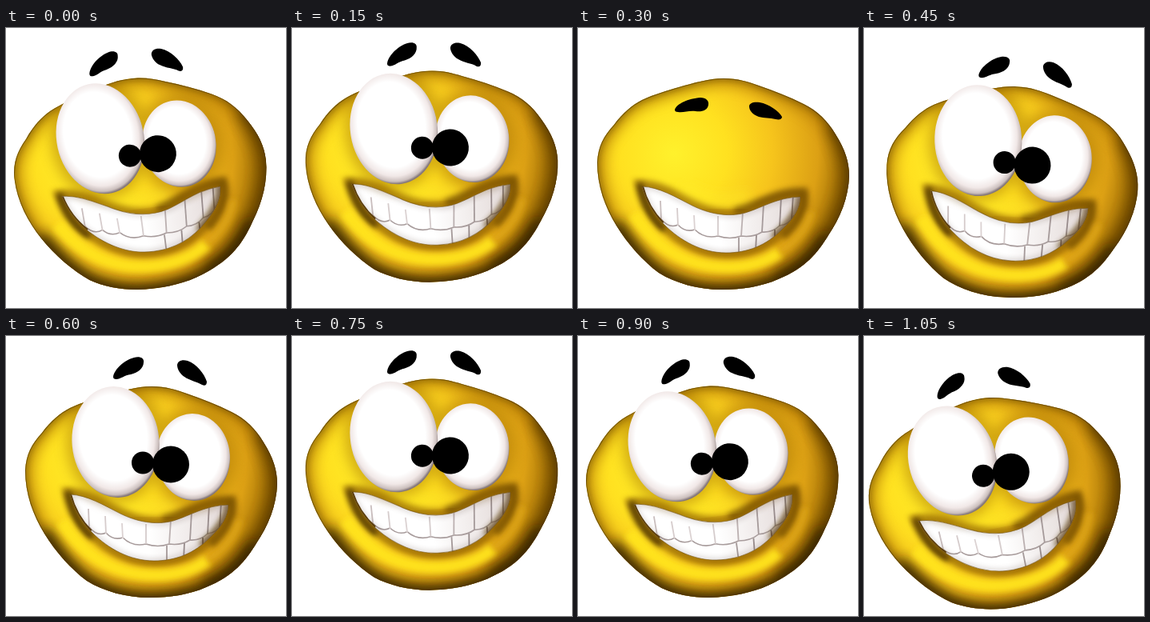
Animation of 350 by 350 pixels, one loop 1200 ms. Source, as an HTML page:

```html
<!DOCTYPE html>
<html lang="en">
<head>
<meta charset="utf-8">
<title>Swaying grin</title>
<style>
html, body { margin: 0; width: 100%; height: 100%; overflow: hidden; background: #fff; }
svg { display: block; width: 100vw; height: 100vh; }
</style>
</head>
<body>
<svg viewBox="0 0 350 350">
  <defs>
    <path id="body" d="M182 63C200 63 212 67 226 72C246 79 264 86 282 95C300 104 312 116 322 133C334 152 339 168 339 185C338 212 328 237 313 259C300 280 285 300 250 314C230 323 205 327 180 327C150 327 122 319 101 306C82 292 62 270 48 247C34 224 24 198 24 168C25 148 32 135 45 121C56 106 68 96 80 90C95 83 112 78 126 74C144 69 163 63 182 63Z"/>
    <path id="mouth" d="M80 198C102 199 121 211 143 222C163 232 187 237 209 231C232 224 248 212 278 211C278 225 270 238 255 252C235 272 212 281 185 281C155 281 128 266 108 246C94 232 85 216 80 198Z"/>
    <clipPath id="bodyClip"><use href="#body"/></clipPath>
    <clipPath id="mouthClip"><use href="#mouth"/></clipPath>
    <radialGradient id="skin" gradientUnits="userSpaceOnUse" cx="120" cy="157" r="225">
      <stop offset="0" stop-color="#fff12c"/>
      <stop offset=".3" stop-color="#ffe120"/>
      <stop offset=".55" stop-color="#f6c41c"/>
      <stop offset=".8" stop-color="#dca014"/>
      <stop offset="1" stop-color="#8a5e00"/>
    </radialGradient>
    <radialGradient id="white" cx=".48" cy=".46" r=".535">
      <stop offset=".72" stop-color="#fff"/>
      <stop offset=".87" stop-color="#f1e8e7"/>
      <stop offset=".96" stop-color="#cbbfbd"/>
      <stop offset="1" stop-color="#85787a"/>
    </radialGradient>
    <linearGradient id="enamel">
      <stop offset=".5" stop-color="#fff"/>
      <stop offset="1" stop-color="#e2d8d6"/>
    </linearGradient>
    <filter id="soft" x="-30%" y="-30%" width="160%" height="160%"><feGaussianBlur stdDeviation="3.5"/></filter>
    <filter id="wide" x="-40%" y="-60%" width="180%" height="220%"><feGaussianBlur stdDeviation="8"/></filter>
  </defs>
  <g id="face">
    <use href="#body" fill="url(#skin)"/>
    <g clip-path="url(#bodyClip)" fill="none">
      <use href="#body" stroke="#a87200" stroke-width="18" opacity=".7" filter="url(#wide)"/>
      <path d="M322 118C336 148 342 170 341 187C340 214 328 240 313 262C298 288 280 304 250 317" stroke="#5a3a00" stroke-width="26" opacity=".75" filter="url(#wide)"/>
      <path d="M45 245C62 272 82 296 101 309C122 322 150 331 180 331C205 331 230 327 252 318C285 304 302 282 315 262" stroke="#2c1c00" stroke-width="20" opacity=".9" filter="url(#wide)"/>
      <use href="#mouth" stroke="#8a5c00" stroke-width="16" opacity=".7" filter="url(#soft)"/>
      <path d="M196 229C226 222 246 204 282 205C286 226 276 244 256 261" stroke="#6b4600" stroke-width="11" opacity=".65" filter="url(#soft)"/>
      <path d="M77 194C82 222 92 240 108 252" stroke="#3c2600" stroke-width="8" opacity=".8" filter="url(#soft)"/>
      <path d="M70 232C90 266 128 299 186 299C214 299 236 292 252 280" stroke="#ffe41f" stroke-width="15" opacity=".95" filter="url(#soft)"/>
      <path d="M252 280C272 268 286 252 292 230" stroke="#e0a818" stroke-width="10" opacity=".7" filter="url(#soft)"/>
      <path d="M130 198C160 218 190 220 214 208" stroke="#fff02a" stroke-width="12" opacity=".55" filter="url(#wide)"/>
      <use href="#body" stroke="#4a3200" stroke-width="4" opacity=".6"  filter="url(#soft)"/>
      <use href="#body" stroke="#4a3200" stroke-width="2" opacity=".6"/>
    </g>
    <use href="#mouth" fill="url(#enamel)"/>
    <g clip-path="url(#mouthClip)" fill="none">
      <path d="M84 228C96 240 103 242 104 239Q114 251 125 246Q134 256 146 252Q158 264 175 260Q190 265 204 260Q219 262 230 255Q243 256 252 247Q264 246 270 234" stroke="#a89c9c" stroke-width="1.6"/>
      <g id="gaps"></g>
      <use href="#mouth" stroke="#6b5750" stroke-width="3" opacity=".45" filter="url(#soft)"/>
      <path d="M279 208C278 224 268 242 244 262" stroke="#5a3c08" stroke-width="9" opacity=".8" filter="url(#soft)"/>
      <path d="M80 198C85 218 94 232 106 244" stroke="#5a3c08" stroke-width="4"/>
    </g>
    <use href="#mouth" fill="none" stroke="#6b4a0c" stroke-width="1" opacity=".6"/>
    <g id="eyes">
      <g clip-path="url(#bodyClip)" fill="#a06a00" opacity=".45" filter="url(#wide)">
        <ellipse cx="234" cy="151" rx="54" ry="63"/>
        <ellipse cx="137" cy="132" rx="62" ry="77"/>
      </g>
      <ellipse cx="234" cy="151.500" rx="46" ry="54.500" transform="rotate(-4 234 151.500)" fill="url(#white)"/>
      <ellipse cx="137" cy="132.500" rx="54.500" ry="69.500" transform="rotate(-5 137 132.500)" fill="url(#white)"/>
      <circle cx="171" cy="158.500" r="14"/>
      <circle cx="206" cy="160.500" r="23"/>
      <path d="M134 51C135 42 148 30 160 27C168 25 173 28 172 33C172 40 165 46 156 48C148 49 143 54 138 54C135 54 134 53 134 51Z"/>
      <path d="M214 36C215 31 220 29 227 31C238 35 248 47 251 57C251 61 249 63 245 61C239 57 230 56 223 51C217 47 214 41 214 36Z"/>
    </g>
    <g id="lids">
      <path d="M121 102C123 95 138 88 153 87C160 87 164 91 163 96C162 103 155 105 147 104C138 103 132 106 125 105C122 105 121 104 121 102Z"/>
      <path d="M214 98C214 94 219 92 227 93C239 95 251 104 255 111C255 114 252 115 247 114C240 112 233 113 226 111C218 108 214 103 214 98Z"/>
    </g>
  </g>
</svg>
<script>
const $ = id => document.getElementById(id);
const STEP = 150, BLINK = 2;

// centre x, centre y, tilt in degrees
const left = [170, 194.5, -7.4], mid = [175.7, 185.5, -3.7], right = [181.5, 195, 0];
const poses = [left, mid, right, [184.5, 205, 2.5], right, mid, left, [166.5, 208.5, -11.3]];

// x at the top, y at the top, x at the bottom, y at the bottom, shade
const gaps = [
  [103, 216, 104, 240, "#c9bebe"], [124, 225, 125, 247, "#d6cccc"],
  [145, 234, 146, 253, "#dbd2d2"], [175, 235, 175, 260, "#d5cccc"],
  [206, 230, 204, 260, "#bbb0b0"], [232, 220, 230, 255, "#a59a9a"],
  [254, 211, 252, 248, "#988c8c"], [269, 208, 267, 239, "#8d8080"],
  [201, 262, 201, 283, "#a59a9a"], [223, 259, 222, 279, "#988c8c"],
  [246, 252, 246, 266, "#7d7070"]
];
$("gaps").innerHTML = gaps.map(([x1, y1, x2, y2, shade]) =>
  `<path d="M${x1} ${y1}L${x2} ${y2}" stroke="${shade}" stroke-width="1.8"/>`).join("");

function draw(ms) {
  const i = Math.floor(ms / STEP) % poses.length;
  const [x, y, tilt] = poses[i];
  $("face").setAttribute("transform", `translate(${x} ${y}) rotate(${tilt}) translate(-181.5 -195)`);
  $("eyes").style.display = i === BLINK ? "none" : "";
  $("lids").style.display = i === BLINK ? "" : "none";
}

const start = performance.now();
function tick() {
  draw(performance.now() - start);
  requestAnimationFrame(tick);
}
tick();
</script>
</body>
</html>
```
